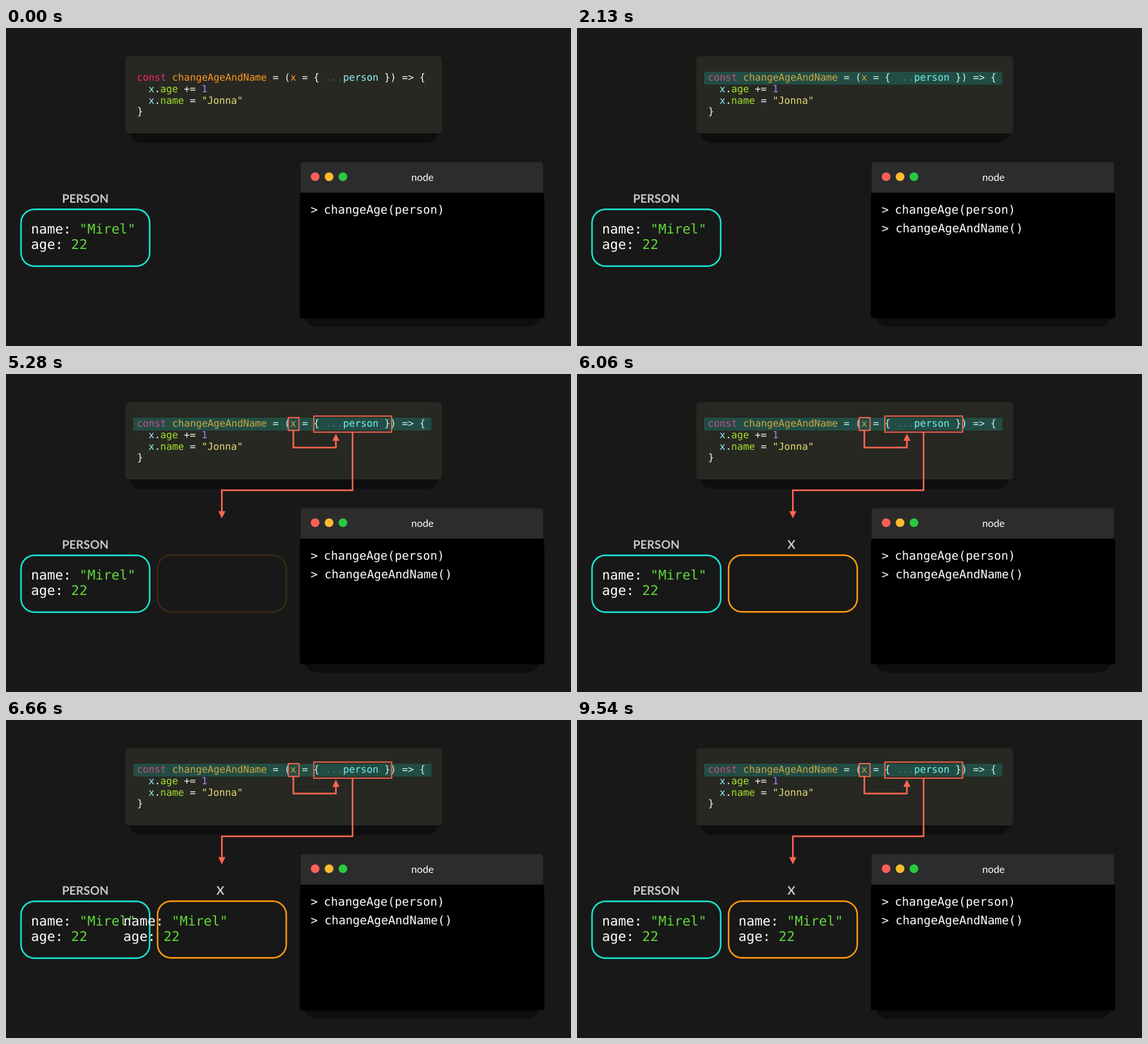
These frames come from a looping animation (880 by 495 pixels, 9.57 s). An HTML page:

```html
<!DOCTYPE html>
<html lang="en">
<head>
<meta charset="utf-8">
<title>Default parameter with spread</title>
<style>
  html, body { margin: 0; width: 100%; height: 100%; overflow: hidden; background: #181818; }
  svg { display: block; width: 880px; height: 495px; }
  text { white-space: pre; text-rendering: geometricPrecision; }

  .code, .term, .object { font-family: "DejaVu Sans Mono", monospace; fill: #fff; }
  .code { font-size: 15.32px; word-spacing: -.25px; fill: #f8f8f2; }
  .term { font-size: 18.35px; }
  .object { font-size: 20.8px; }
  .title, .label { font-family: Lato, sans-serif; text-anchor: middle; }
  .title { font-size: 15.8px; fill: #fff; }
  .label { font-size: 18.3px; font-weight: 700; fill: #c8c8c8; }

  .key { fill: #f92672; }
  .fn { fill: #fd971f; }
  .var { fill: #94f3fb; }
  .prop { fill: #a6e22e; }
  .num { fill: #ae81ff; }
  .str { fill: #e6db74; }
  .dim { fill: #555; }
  .val { fill: #62d93a; }

  .card { fill: none; stroke-width: 2.4; }
  .red { fill: none; stroke: #ff6650; }
  .head { fill: #ff6650; }
  .line { stroke-width: 2.5; stroke-dasharray: 1 2; }

  /* Every part shares one 9570 ms loop. */
  .anim { animation: 9570ms linear infinite; }
  .typing { animation-name: typing; transform-origin: 473.8px 0; }
  .mark { animation-name: mark; }
  .param { animation-name: param; }
  .line1 { animation-name: line1; }
  .head1 { animation-name: head1; }
  .spread { animation-name: spread; }
  .line2 { animation-name: line2; }
  .head2 { animation-name: head2; }
  .xcard { animation-name: xcard; }
  .xlabel { animation-name: xlabel; }
  .copy { animation-name: copy; }

  @keyframes typing {
    0%, 3.7617% { transform: scaleX(0); }
    3.7618% { transform: scaleX(.05); animation-timing-function: steps(19, end); }
    13.166%, 100% { transform: scaleX(1); }
  }
  @keyframes mark { 0%, 18.182% { opacity: 0; } 22.257%, 100% { opacity: 1; } }
  @keyframes param { 0%, 27.273% { opacity: 0; } 31.348%, 100% { opacity: 1; } }
  @keyframes line1 {
    0%, 31.348% { stroke-dashoffset: 1.01; animation-timing-function: ease-in-out; }
    37.304%, 100% { stroke-dashoffset: 0; }
  }
  @keyframes head1 { 0%, 36.9% { opacity: 0; } 37.304%, 100% { opacity: 1; } }
  @keyframes spread { 0%, 37.304% { opacity: 0; } 41.379%, 100% { opacity: 1; } }
  @keyframes line2 {
    0%, 46.082% { stroke-dashoffset: 1.01; animation-timing-function: ease-in-out; }
    54.545%, 100% { stroke-dashoffset: 0; }
  }
  @keyframes head2 { 0%, 54.2% { opacity: 0; } 54.545%, 100% { opacity: 1; } }
  @keyframes xcard { 0%, 54.545% { opacity: 0; } 58.934%, 100% { opacity: 1; } }
  @keyframes xlabel { 0%, 58.934% { opacity: 0; } 63.009%, 100% { opacity: 1; } }
  @keyframes copy {
    0%, 63.635% { visibility: hidden; transform: translateX(0); }
    63.636% { visibility: visible; transform: translateX(0); animation-timing-function: cubic-bezier(.37, 0, .63, 1); }
    73.354%, 100% { visibility: visible; transform: translateX(212.5px); }
  }
</style>
</head>
<body>
<svg viewBox="0 0 880 495">
  <defs>
    <clipPath id="typed"><rect class="anim typing" x="473.8" y="296" width="221" height="30"/></clipPath>
    <g id="fields" class="object">
      <text x="39" y="320.3">name: <tspan class="val">"Mirel"</tspan></text>
      <text x="39" y="344.4">age: <tspan class="val">22</tspan></text>
    </g>
  </defs>

  <!-- Code panel -->
  <rect x="191" y="120" width="483" height="59" rx="20" fill="#0e0e0e"/>
  <rect x="186" y="44" width="493" height="120" rx="5" fill="#272822"/>
  <g class="code">
    <text x="203.7" y="82.3"><tspan class="key">const</tspan> <tspan class="fn">changeAgeAndName</tspan> = (<tspan class="fn">x</tspan> = { <tspan class="dim">...</tspan><tspan class="var">person</tspan> }) =&gt; {</text>
    <text x="221.9" y="100.3"><tspan class="var">x</tspan>.<tspan class="prop">age</tspan> += <tspan class="num">1</tspan></text>
    <text x="221.9" y="118.3"><tspan class="var">x</tspan>.<tspan class="prop">name</tspan> = <tspan class="str">"Jonna"</tspan></text>
    <text x="204.2" y="135.3">}</text>
  </g>
  <rect class="anim mark" x="198" y="68" width="464.5" height="20" fill="#12e1cc" fill-opacity=".2"/>

  <!-- Terminal -->
  <rect x="464" y="400" width="368" height="65" rx="20" fill="#0e0e0e"/>
  <path d="M459 256.5V213a4 4 0 0 1 4-4H832.5a4 4 0 0 1 4 4V256.5Z" fill="#2c2c2c"/>
  <path d="M458.5 256.5H837.5L838.5 272V448a4 4 0 0 1-4 4H461.5a4 4 0 0 1-4-4V272Z"/>
  <circle cx="481.5" cy="231.5" r="6.8" fill="#ff5f57"/>
  <circle cx="503.2" cy="231.5" r="6.8" fill="#fdbc2f"/>
  <circle cx="524.8" cy="231.5" r="6.8" fill="#28c941"/>
  <text class="title" x="648.7" y="238">node</text>
  <g class="term">
    <text x="474.6" y="289">&gt;</text><text x="495" y="289">changeAge(person)</text>
    <g clip-path="url(#typed)">
      <text x="474.6" y="318.4">&gt;</text><text x="495.9" y="318.4">changeAgeAndName()</text>
    </g>
  </g>

  <!-- Objects -->
  <text class="label" x="123.5" y="272">PERSON</text>
  <rect class="card" x="23.4" y="282.2" width="200.4" height="88.6" rx="21" stroke="#18e6d2"/>
  <use href="#fields"/>
  <rect class="card anim xcard" x="236.1" y="282" width="200.4" height="88.2" rx="21" stroke="#ff9a0c"/>
  <text class="label anim xlabel" x="333.8" y="272">X</text>
  <g class="anim copy"><use href="#fields"/></g>

  <!-- Callouts -->
  <rect class="red anim param" x="439.7" y="67.8" width="16.7" height="20" stroke-width="1.8"/>
  <path class="red line anim line1" pathLength="1" d="M447.6 87V114.4H513.8V103"/>
  <path class="head anim head1" d="M508.3 104L513.8 93L519.3 104Z"/>
  <rect class="red anim spread" x="479.4" y="65.5" width="121.2" height="25" stroke-width="1.8"/>
  <path class="red line anim line2" pathLength="1" d="M539.8 91V181H336.2V214"/>
  <path class="head anim head2" d="M330.7 213.5L336.2 224.8L341.7 213.5Z"/>
</svg>
</body>
</html>
```
